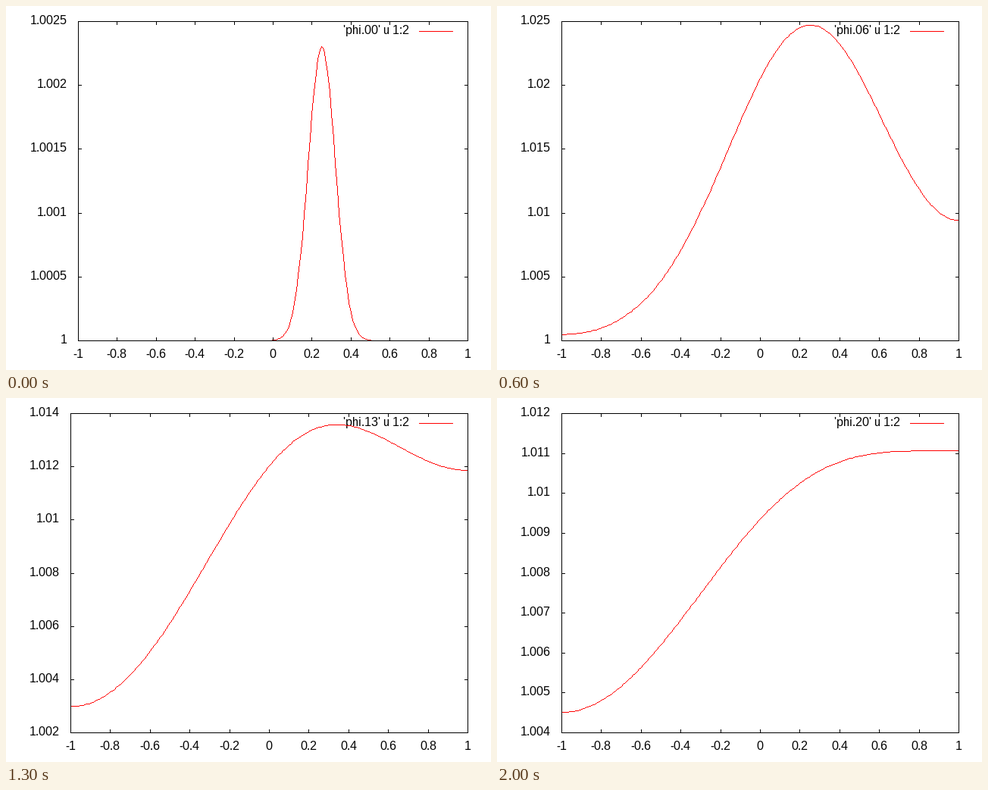
Recreate the animation shown at these times as a matplotlib script. Size 640x480 px, loop 2600 ms.

```python
import math

import matplotlib.pyplot as plt
import numpy as np
from matplotlib.animation import FuncAnimation

W, H, DPI = 640, 480, 100
PX = 72 / DPI
TOP, BOTTOM, RIGHT, TICK = 20, 441, 609, 4
LAST, FRAMES, STEP_MS = 20, 26, 100
CENTRE = 0.25
X = np.linspace(-1, 1, 201)
BLACK, RED = (0, 0, 0, 255), (255, 0, 0, 255)

plt.rcParams.update({"font.family": "Liberation Sans",
                     "text.hinting": "native", "text.hinting_factor": 1})
fig = plt.figure(figsize=(W / DPI, H / DPI), dpi=DPI, facecolor="white")
canvas = np.zeros((H, W, 4), np.uint8)
layer = fig.figimage(canvas, origin="upper", zorder=5)


def mass(n):
    """Total amount: a fast rise, then a slow decay."""
    return 0.0157 + 0.0223 * math.exp(-0.137 * n) - 0.0376 * math.exp(-1.511 * n)


def phi(n):
    """Spreading pulse between two reflecting walls, above a level of 1."""
    var = 0.0048 + 0.0275 * n
    images = [c + 4 * k for c in (CENTRE, 2 - CENTRE) for k in (-1, 0, 1)]
    pulse = sum(np.exp(-(X - c) ** 2 / (2 * var)) for c in images)
    return mass(n) * pulse / math.sqrt(2 * math.pi * var)


def tick_step(span):
    power = 10 ** math.floor(math.log10(span))
    density = 20 * power / span
    for limit, step in ((40, 0.05), (20, 0.1), (10, 0.2), (4, 0.5), (2, 1)):
        if density > limit:
            return step * power
    return 2 * power


def pixel(v):
    return np.floor(np.asarray(v) + 0.5).astype(int)


def line(xs, ys, color=BLACK):
    """Polyline one pixel wide, without smoothing."""
    xs, ys = pixel(xs), pixel(ys)
    for x0, y0, x1, y1 in zip(xs, ys, xs[1:], ys[1:]):
        count = max(abs(x1 - x0), abs(y1 - y0)) + 1
        canvas[pixel(np.linspace(y0, y1, count)),
               pixel(np.linspace(x0, x1, count))] = color


def label(x, y, text, ha):
    fig.text(x / W, 1 - y / H, text, ha=ha, va="baseline", fontsize=16 * PX)


def draw(i):
    n = min(i, LAST)
    canvas[:] = 0
    for old in list(fig.texts):
        old.remove()

    y = phi(n)
    step = tick_step(y.max() - y.min())
    lo = math.floor(y.min() / step)
    hi = math.ceil(y.max() / step)
    names = [f"{1 + k * step:g}" for k in range(lo, hi + 1)]
    left = 75 + 10 * (max(map(len, names)) - 4)

    def to_x(v):
        return left + (RIGHT - left) * (v + 1) / 2

    def to_y(ticks):
        return BOTTOM - (BOTTOM - TOP) * (ticks - lo) / (hi - lo)

    label(532, 37, f"'phi.{n:02d}' u 1:2", "right")
    line([545, 589], [33, 33], RED)
    line(to_x(X), to_y(y / step), RED)

    for k, name in enumerate(names, lo):
        py = pixel(to_y(k))
        line([left, left + TICK], [py, py])
        line([RIGHT - TICK, RIGHT], [py, py])
        label(left - 14, py + 4, name, "right")

    for k in range(-5, 6):
        px = pixel(to_x(k / 5))
        line([px, px], [BOTTOM - TICK, BOTTOM])
        line([px, px], [TOP, TOP + TICK])
        label(px, 464, f"{k / 5:g}", "center")

    line([left, RIGHT, RIGHT, left, left], [TOP, TOP, BOTTOM, BOTTOM, TOP])
    layer.set_data(canvas)
    return []


anim = FuncAnimation(fig, draw, frames=FRAMES, init_func=lambda: [],
                     interval=STEP_MS, repeat=True, repeat_delay=0, blit=False)
plt.show()
```
